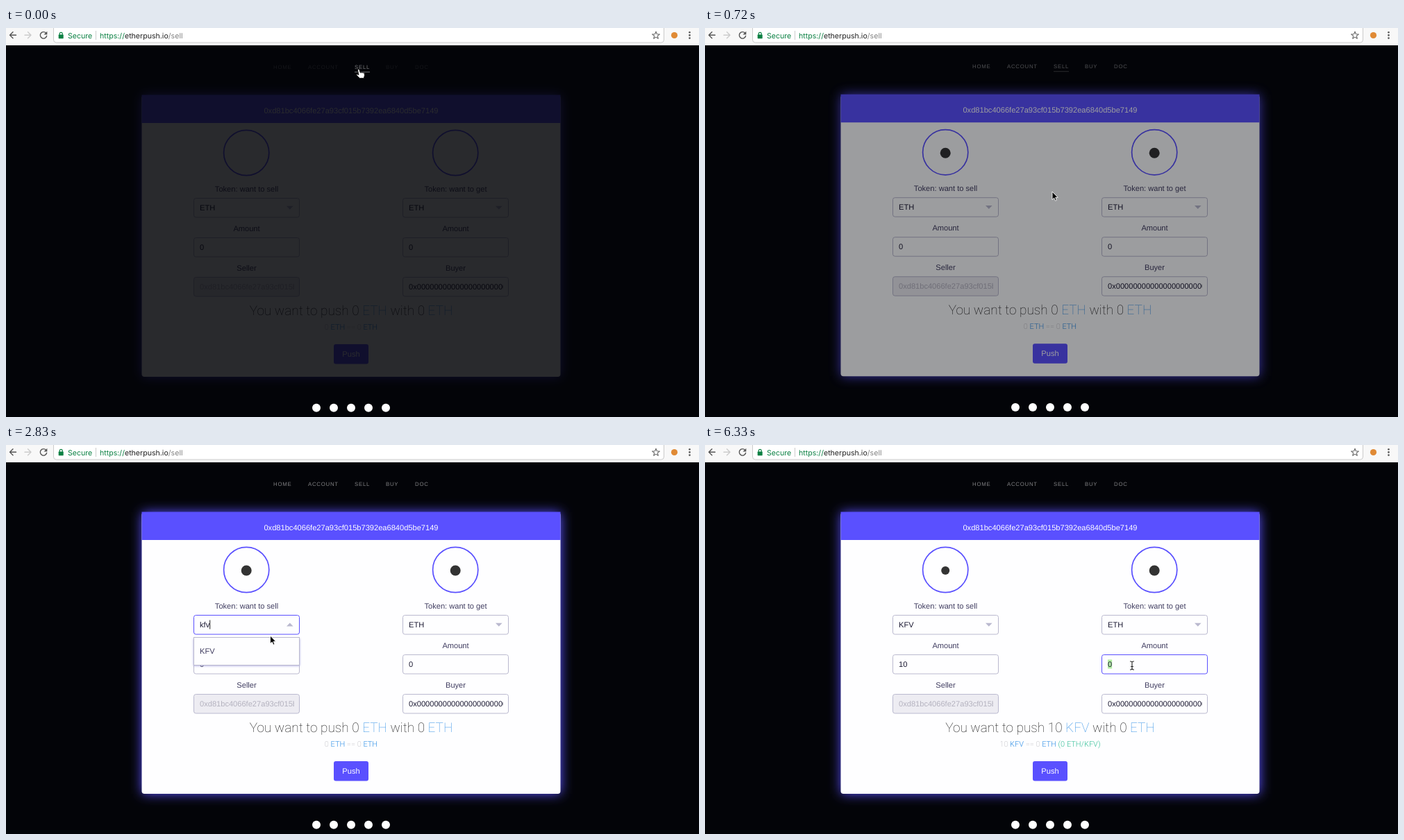
These frames come from a looping animation (998 px wide and 561 px high, 8000 ms). An HTML page:

```html
<!DOCTYPE html>
<html lang="en">
<head>
<meta charset="utf-8">
<title>Sell</title>
<style>
  html, body { margin: 0; width: 100%; height: 100%; overflow: hidden; background: #030408; }
  svg { display: block; width: 998px; height: 561px; }
  text { font: 11.1px "Liberation Sans", Arial, sans-serif; white-space: pre; text-rendering: geometricPrecision; }
  .mid { text-anchor: middle; }
  .label { fill: #403d60; }
  .value { fill: #1c1a33; }
  .muted { fill: #b4b2bf; }
  .white { fill: #fff; }
  .nav { font-size: 7.8px; letter-spacing: .75px; fill: #fff; }
  .bar { font: 10.6px Inter, sans-serif; }
  .title { font: 200 19px Roboto, sans-serif; fill: #111; }
  .sub { font: 200 11px Roboto, sans-serif; fill: #a2a2a8; }
  .sub .blue, .sub .green { font-weight: 300; }
  .blue { fill: #2f8fe6; }
  .green { fill: #35bf98; }
  .line { fill: none; stroke-linecap: round; stroke-linejoin: round; }
</style>
</head>
<body>
<svg id="stage" viewBox="0 0 998 561">
  <defs>
    <filter id="blur" x="-10%" y="-10%" width="120%" height="120%"><feGaussianBlur stdDeviation="8.5"/></filter>
    <filter id="soft" x="-10%" y="-10%" width="120%" height="130%"><feGaussianBlur stdDeviation="1.5"/></filter>
    <clipPath id="clipL"><rect x="279" y="355" width="136" height="36"/></clipPath>
    <clipPath id="clipR"><rect x="580" y="355" width="136" height="36"/></clipPath>
    <clipPath id="clipList"><rect x="270.5" y="278" width="152" height="217"/></clipPath>
  </defs>
</svg>
<script>
const LOOP = 8000;
const ACCENT = '#5a50ff', EDGE = '#bab9cf', PAPER = '#fefeff';
const WALLET = '0xd81bc4066fe27a93cf015b7392ea6840d5be7149';
const TOKEN = 'KFV';
const ITEMS = ['CQO', 'CIQA', 'CVH', 'DQF', 'DYJ', 'EFQ', 'EKP', 'ETH'];
const LEFT = 270, RIGHT = 571, FIELD_W = 153;

const stage = document.getElementById('stage');

function add(parent, tag, attrs = {}, content) {
  const el = document.createElementNS('http://www.w3.org/2000/svg', tag);
  set(el, attrs);
  if (content !== undefined) el.textContent = content;
  return parent.appendChild(el);
}
function set(el, attrs) {
  for (const key in attrs) el.setAttribute(key, attrs[key]);
}
const show = (el, on) => set(el, { visibility: on ? 'visible' : 'hidden' });
const group = (parent, attrs) => add(parent, 'g', attrs);
const rect = (parent, x, y, width, height, attrs) => add(parent, 'rect', { x, y, width, height, ...attrs });
const dot = (parent, cx, cy, r, fill) => add(parent, 'circle', { cx, cy, r, fill });
const path = (parent, d, attrs) => add(parent, 'path', { d, ...attrs });
const text = (parent, x, y, str, cls) => add(parent, 'text', { x, y, class: cls }, str);

function setRuns(el, runs) {
  el.textContent = '';
  for (const [str, cls] of runs) add(el, 'tspan', cls ? { class: cls } : {}, str);
}

// Page: navigation, card, footer
const page = group(stage);
const nav = group(page), navItems = {};
for (const [x, name] of [[385, 'HOME'], [435, 'ACCOUNT'], [502, 'SELL'], [547, 'BUY'], [589, 'DOC']])
  navItems[name] = text(nav, x, 58.6, name, 'nav');
const navLine = rect(nav, 502, 63, 22, 1, { fill: '#fff' });

const card = group(page);
rect(card, 196, 97, 603, 406, { fill: ACCENT, filter: 'url(#blur)' });
rect(card, 195.5, 97, 603, 406, { rx: 4, fill: PAPER });
rect(card, 195.5, 96.5, 603, 40.5, { fill: ACCENT });
text(card, 497, 122.8, WALLET, 'mid white');

function field(x, y, fill = 'none') {
  return rect(card, x + .5, y + .5, FIELD_W - 1, 27.5, { rx: 3, fill, stroke: EDGE });
}
function column(x, verb, person) {
  const cx = x + FIELD_W / 2;
  add(card, 'circle', { cx: cx - .3, cy: 180, r: 32.6, fill: 'none', stroke: ACCENT, 'stroke-width': 1.7 });
  const icon = dot(card, cx - .3, 181, 7.5, '#333');
  [`Token: want to ${verb}`, 'Amount', person].forEach((s, i) =>
    text(card, cx, 235.5 + 57 * i, s, 'mid label'));
  const col = { icon, token: field(x, 245), amount: field(x, 302) };
  field(x, 359, x === LEFT ? '#edecf2' : 'none');
  col.arrow = path(card, '', { fill: EDGE });
  col.mark = rect(card, x + 9, 0, 0, 13, { fill: '#b5efa6' });
  col.tokenText = text(card, x + 9, 263, 'ETH', 'value');
  col.amountText = text(card, x + 9, 320, '0', 'value');
  col.flip = up => set(col.arrow, {
    d: up ? `M${x + 134} 261.5h9.6l-4.8-5z` : `M${x + 134} 256.8h9.6l-4.8 5z`
  });
  col.flip(false);
  return col;
}
const left = column(LEFT, 'sell', 'Seller');
const right = column(RIGHT, 'get', 'Buyer');
add(card, 'text', { x: 279, y: 377, class: 'muted', 'clip-path': 'url(#clipL)' }, WALLET);
add(card, 'text', { x: 580, y: 377, class: 'value', 'clip-path': 'url(#clipR)' }, '0x' + '0'.repeat(40));

const title = text(card, 497, 414, '', 'title mid');
const sub = text(card, 497, 435.2, '', 'sub mid');
rect(card, 472, 456, 50, 28.5, { rx: 3, fill: ACCENT });
text(card, 497, 474, 'Push', 'mid white');
const caret = rect(card, 0, 0, 1, 13, { fill: '#222' });

// Token list
const menu = group(card);
const shade = rect(menu, 270, 279, 153, 217, { fill: '#a9a5e0', filter: 'url(#soft)' });
const sheet = rect(menu, 270.5, 277.5, 152, 217.5, { fill: PAPER, stroke: EDGE });
const fullList = group(menu, { 'clip-path': 'url(#clipList)' });
ITEMS.forEach((name, i) => {
  const y = 281.5 + 28.5 * i, last = i === ITEMS.length - 1;
  if (last) rect(fullList, 271, y - 14.5, 151, 28.5, { fill: ACCENT });
  text(fullList, 279, y + 4, name, last ? 'white' : 'label');
});
const match = text(menu, 279, 301, TOKEN, 'label');

[447, 472, 497, 522, 547].forEach(x => dot(page, x, 547.8, 6, '#fff'));

// Browser toolbar
const bar = group(stage);
rect(bar, 0, 0, 998, 25, { fill: '#f8f8f8' });
rect(bar, 68.5, -6, 879, 27, { rx: 4, fill: '#fff', stroke: '#cbcbcb' });
path(bar, 'M14.5 10.3H5.5M10 5.8 5.5 10.3 10 14.8', { class: 'line', stroke: '#555', 'stroke-width': 1.4 });
path(bar, 'M27 10.3h9M31.5 5.8 36 10.3l-4.5 4.5', { class: 'line', stroke: '#ccc', 'stroke-width': 1.4 });
path(bar, 'M57.6 7.3A4.7 4.7 0 1 0 58.6 11.5', { class: 'line', stroke: '#555', 'stroke-width': 1.4 });
path(bar, 'M59.3 4.8v4.8h-4.8z', { fill: '#555' });
rect(bar, 75.7, 9.6, 7, 5.6, { rx: .6, fill: '#0b8043' });
path(bar, 'M77.2 10V8.3a2 2 0 0 1 4 0V10', { class: 'line', stroke: '#0b8043', 'stroke-width': 1.2 });
add(bar, 'text', { x: 89, y: 14.5, class: 'bar', fill: '#0b8043' }, 'Secure');
rect(bar, 129, 4, 1, 13, { fill: '#ccc' });
const url = text(bar, 135, 14.5, '', 'bar');
for (const [str, fill] of [['https://', '#0b8043'], ['etherpush.io', '#222'], ['/sell', '#808080']])
  add(url, 'tspan', { fill }, str);
const star = Array.from({ length: 10 }, (_, i) => {
  const r = i % 2 ? 2.4 : 5.6, a = Math.PI * (i / 5 - .5);
  return `${936 + r * Math.cos(a)},${10.7 + r * Math.sin(a)}`;
});
add(bar, 'polygon', { points: star.join(' '), class: 'line', stroke: '#666', 'stroke-width': 1.1 });
dot(bar, 962.5, 10.5, 4.6, '#e08a35');
[6.2, 10.4, 14.6].forEach(y => dot(bar, 984.5, y, 1.3, '#555'));

// Mouse pointers
const pointer = group(stage);
const pointers = {
  hand: path(pointer, 'M-3.6-6.2q1.6-1.4 2.6.6l1.2 4q1-1 2 0 1.2-.8 2 .3 1.6-.6 2 1l.2 2.8-1 3.9h-6.2l-4.6-4.6q.2-1.8 2-.8l1.2.8z',
    { fill: '#fff', stroke: '#111' }),
  arrow: path(pointer, 'M0 0V11.6L2.7 9.1 4.5 13.2 6.4 12.4 4.7 8.4H8.2Z',
    { fill: '#000', stroke: '#fff', 'stroke-width': .9 }),
  beam: path(pointer, 'M-2.5-6Q0-6 0-4.5V4.5Q0 6-2.5 6M2.5-6Q0-6 0-4.5M0 4.5Q0 6 2.5 6M-1.5 1.5H1.5',
    { class: 'line', stroke: '#222', 'stroke-width': 1.1 })
};

// Each step lists only what changes at that time
const steps = [
  [0, { fade: .15, dy: 0, hover: .48, line: .4, icon: 0, cur: 'hand', at: [510, 66], token: 'ETH', entry: 'ETH',
        amount: 0, focus: '', mark: '', caret: 0, menu: '', grow: 1 }],
  [150, { fade: .3, icon: .6, cur: 'arrow', at: [517, 140] }],
  [420, { fade: .45, hover: .4, icon: 1, at: [524, 224] }],
  [720, { fade: .61, hover: .3, line: .15, dy: -.8, at: [500, 236] }],
  [930, { fade: .76, hover: 0, line: 0, dy: -1.6, at: [457.5, 240] }],
  [1190, { fade: .9, dy: -.8, at: [425, 251] }],
  [1400, { fade: .97, dy: 0, cur: 'hand', at: [402, 263] }],
  [1670, { fade: .98, at: [397, 266], focus: 'token', mark: 'token', menu: 'full', grow: .9 }],
  [2000, { grow: 1 }],
  [2210, { at: [393, 269] }],
  [2420, { fade: .99, cur: 'arrow', at: [385, 273], mark: '', menu: 'one', entry: 'k', caret: 1 }],
  [2620, { at: [380.5, 275], entry: 'kf' }],
  [2830, { fade: 1, entry: 'kfv' }],
  [3010, { menu: '', caret: 0, entry: TOKEN }],
  [3160, { token: TOKEN, at: [376, 279] }],
  [3310, { at: [356, 296] }],
  [3460, { cur: 'beam', at: [334, 315] }],
  [3790, { at: [331, 317], focus: 'left', caret: 1 }],
  [4000, { mark: 'left', caret: 0 }],
  [4680, { mark: '', amount: 10, caret: 1 }],
  [5130, { at: [372, 317], caret: 0 }],
  [5280, { cur: 'arrow', at: [450, 311] }],
  [5730, { at: [520, 313] }],
  [5880, { at: [562, 314] }],
  [6030, { cur: 'beam', at: [605, 318] }],
  [6180, { at: [615, 318], focus: 'right', caret: 1 }],
  [6330, { mark: 'right', caret: 0 }]
];
let last = {};
const states = steps.map(([, change]) => last = { ...last, ...change });

function render(s) {
  set(page, { transform: `translate(0 ${s.dy})` });
  set(card, { opacity: s.fade });
  for (const name in navItems)
    set(navItems[name], { 'fill-opacity': Math.max(.5 * s.fade, name === 'SELL' ? s.hover : 0) });
  set(navLine, { opacity: s.line });

  const swapped = s.token === TOKEN;
  set(left.icon, { opacity: s.icon, r: swapped ? 6 : 7.5 });
  set(right.icon, { opacity: s.icon });
  left.tokenText.textContent = s.entry;
  left.amountText.textContent = s.amount;

  const inputs = {
    token: [left.token, left.tokenText, left, 252.5],
    left: [left.amount, left.amountText, left, 309.5],
    right: [right.amount, right.amountText, right, 309.5]
  };
  for (const key in inputs) set(inputs[key][0], { stroke: key === s.focus ? ACCENT : EDGE });
  set(left.mark, { width: 0 });
  set(right.mark, { width: 0 });
  if (s.mark) {
    const [, label, col, y] = inputs[s.mark];
    set(col.mark, { y, width: label.getComputedTextLength() });
  }
  show(caret, s.caret);
  if (s.caret) {
    const [, label, , y] = inputs[s.focus];
    set(caret, { x: +label.getAttribute('x') + label.getComputedTextLength(), y });
  }

  left.flip(s.menu);
  set(menu, {
    display: s.menu ? 'inline' : 'none',
    transform: `translate(0 278) scale(1 ${s.grow}) translate(0 -278)`
  });
  const height = s.menu === 'one' ? 40 : 217.5;
  set(sheet, { height });
  set(shade, { height: height - .5 });
  show(fullList, s.menu === 'full');
  show(match, s.menu === 'one');

  setRuns(title, [[`You want to push ${s.amount} `], [s.token, 'blue'], [' with 0 '], ['ETH', 'blue']]);
  const runs = [[`${s.amount} `], [s.token, 'blue'], [' == 0 '], ['ETH', 'blue']];
  if (s.amount) runs.push([` (0 ETH/${s.token})`, 'green']);
  setRuns(sub, runs);

  set(pointer, { transform: `translate(${s.at})` });
  for (const name in pointers) show(pointers[name], name === s.cur);
}

const start = performance.now();
let current = -1;
function tick() {
  const t = (performance.now() - start) % LOOP;
  let i = steps.length - 1;
  while (steps[i][0] > t) i--;
  if (i !== current) render(states[current = i]);
  requestAnimationFrame(tick);
}
tick();
</script>
</body>
</html>
```
